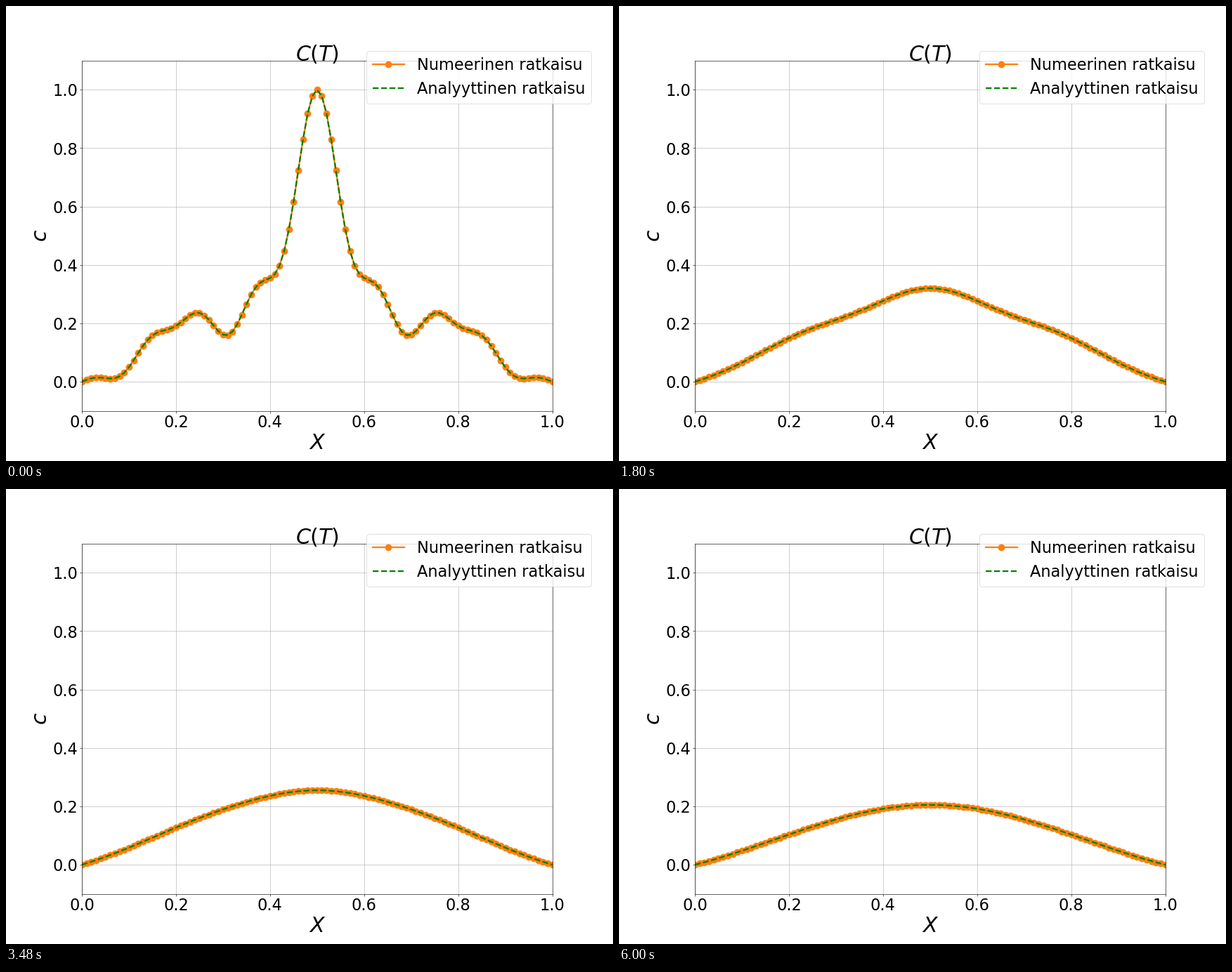
Animation, 864 px wide and 648 px high, one loop 6.06 s. Source, as a matplotlib script:

```python
import numpy as np
import matplotlib.pyplot as plt
from matplotlib.animation import FuncAnimation

FRAMES = 101
INTERVAL = 60      # ms
DECAY = 0.00487    # decay of the slowest mode per frame
TEXT, LABEL = 30, 40

plt.rcParams["font.family"] = "DejaVu Sans"
plt.rcParams["font.size"] = TEXT

x = np.linspace(0, 1, 101)


def concentration(step):
    """Spherical diffusion: mean of three sinc modes around the centre."""
    r = x - 0.5
    modes = [np.sinc(2 * n**2 * r) * np.exp(-DECAY * n**4 * step)
             for n in (1, 2, 3)]
    return np.mean(modes, axis=0)


fig, ax = plt.subplots(figsize=(16, 12), dpi=54)
numeric, = ax.plot(x, concentration(0), "o-", color="#ff7f0e", lw=3,
                   markersize=12, label="Numeerinen ratkaisu")
analytic, = ax.plot(x, concentration(0), "--", color="green", lw=3,
                    label="Analyyttinen ratkaisu")

ax.set_xlim(0, 1)
ax.set_ylim(-0.1, 1.1)
ax.set_xticks(np.arange(6) / 5)
ax.set_yticks(np.arange(6) / 5)
ax.grid(True)
# A fixed y lets the title overlap the top edge of the axes.
ax.set_title("$C(T)$", fontsize=LABEL, y=1.0, pad=0)
ax.set_xlabel("$X$", fontsize=LABEL)
ax.set_ylabel("$c$", fontsize=LABEL)
ax.legend(loc="upper right", bbox_to_anchor=(1.1, 1.05), fontsize=TEXT)


def update(step):
    c = concentration(step)
    numeric.set_ydata(c)
    analytic.set_ydata(c)
    return numeric, analytic


anim = FuncAnimation(fig, update, frames=FRAMES, interval=INTERVAL,
                     repeat=True, repeat_delay=0)
plt.show()
```
